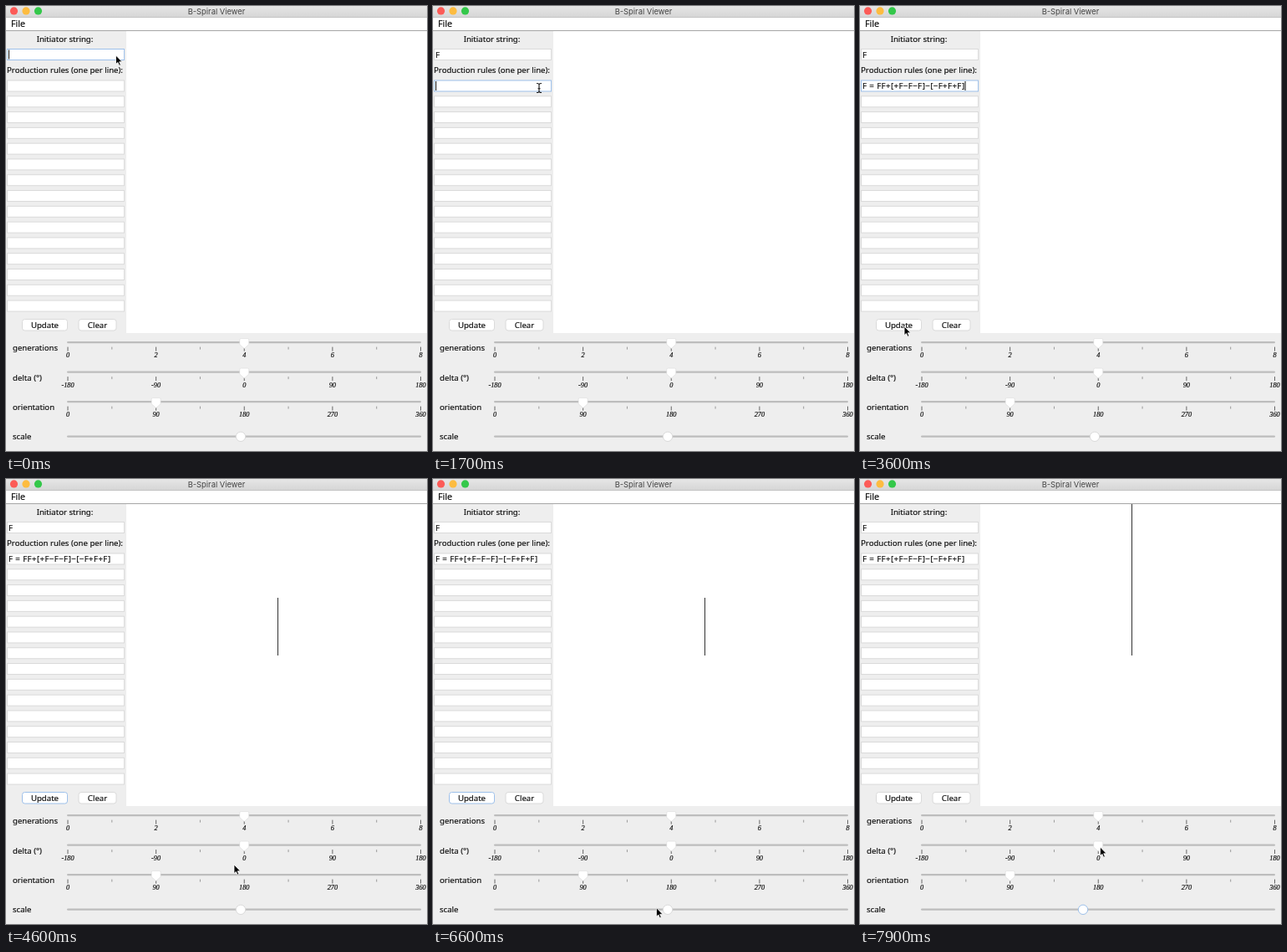
These frames come from a looping animation (504x532 px, 8000 ms). An HTML page:

```html
<!DOCTYPE html>
<html lang="en">
<head>
<meta charset="utf-8">
<title>B-Spiral Viewer</title>
<style>
  html, body { margin: 0; width: 100%; height: 100%; overflow: hidden; background: #eee; }
  svg { display: block; width: 504px; height: 532px; }
  text { font: 9.6px "Noto Sans", "Open Sans", sans-serif; fill: #111; stroke: #111; stroke-width: .18; white-space: pre; }
  .title { font: 9.4px Inter, Roboto, sans-serif; fill: #444; stroke: none; }
  .menu { font-size: 10.6px; }
  .num { font: italic 8.3px "Liberation Serif", serif; }
  .rule { letter-spacing: .43px; }
  .mid { text-anchor: middle; }
</style>
</head>
<body>
<svg id="stage" viewBox="0 0 504 532">
  <defs>
    <linearGradient id="bar" x2="0" y2="1">
      <stop stop-color="#e6e6e6"/><stop offset="1" stop-color="#d6d6d6"/>
    </linearGradient>
  </defs>
</svg>
<script>
const LOOP = 8000, STEP = 100, BLINK = 500;
const FOCUS = '#9dc0ea', EDGE = '#dadada';
// Moments of the session, in ms
const TYPE_START = 1100, PICK_RULE = 1700, PASTE = 2400, PRESS = 3900, GROW = 6700;
const stage = document.getElementById('stage');

function set(el, attrs) {
  for (const k in attrs) el.setAttribute(k, attrs[k]);
  return el;
}
function add(tag, attrs, text) {
  const el = set(document.createElementNS('http://www.w3.org/2000/svg', tag), attrs);
  if (text !== undefined) el.textContent = text;
  stage.append(el);
  return el;
}
const rect = (x, y, width, height, fill, more) => add('rect', { x, y, width, height, fill, ...more });
const label = (x, y, text, cls = '') => add('text', { x, y, class: cls }, text);
const show = (el, on) => set(el, { visibility: on ? 'visible' : 'hidden' });
const outline = (el, on) => set(el, { stroke: on ? FOCUS : EDGE });

// Window frame
rect(0, 0, 504, 13, 'url(#bar)');
rect(0, 13, 504, 1, '#c4c4c4');
rect(0, 14, 504, 15, '#fff');
rect(0, 29, 504, 1, '#a6a6a6');
rect(144, 30, 360, 361, '#fff');
['#fc5b57', '#fdbc40', '#34c84a'].forEach((fill, i) =>
  add('circle', { cx: 9.5 + i * 14.5, cy: 5.9, r: 4.6, fill }));
label(252, 9.8, 'B-Spiral Viewer', 'title mid');
label(6, 25.3, 'File', 'menu');

// Text fields
label(70.5, 43, 'Initiator string:', 'mid');
label(70.5, 80.3, 'Production rules (one per line):', 'mid');
const field = cy => rect(1.5, cy - 6.5, 140, 13, '#fff', { stroke: EDGE });
const startField = field(58);
const ruleFields = Array.from({ length: 15 }, (_, i) => field(95.5 + i * 18.79));
const startText = label(3, 61.5, 'F');
const ruleText = label(3, 99, 'F = FF+[+F−F−F]−[−F+F+F]', 'rule');
const caret = rect(0, 0, 1, 11, '#111');

// Buttons
function button(x, w, text) {
  const box = rect(x + .5, 374.5, w - 1, 13.5, '#fff', { rx: 3, stroke: EDGE });
  label(x + w / 2, 384.7, text, 'mid');
  return box;
}
const update = button(19, 55, 'Update');
button(86.5, 46, 'Clear');

// Sliders
const track = y => rect(73, y - 1.2, 424, 2.4, '#bdbdbd', { rx: 1.2 });

function slider(name, y, min, max, value) {
  const xOf = v => 74 + 422.5 * (v - min) / (max - min);
  label(8, y + 10.3, name);
  track(y);
  for (let i = 0; i <= 8; i++) {
    const v = min + (max - min) * i / 8, x = xOf(v), major = i % 2 === 0;
    rect(x - .5, y + 5.5, 1, major ? 5 : 3, major ? '#666' : '#999');
    if (major) label(x, y + 17.9, v, 'num mid');
  }
  add('path', {
    d: `M${xOf(value) - 5.5} ${y - 3}q0-1.5 1.5-1.5h8q1.5 0 1.5 1.5v5.5l-5.5 5-5.5-5z`,
    fill: '#fff', stroke: EDGE, 'stroke-width': .6
  });
}
slider('generations', 402.1, 0, 8, 4);
slider('delta (°)', 437.6, -180, 180, 0);
slider('orientation', 473.1, 0, 360, 90);
label(8, 518.3, 'scale');
track(514.6);
const knob = add('circle', { cy: 514.8, r: 5.7, fill: '#fff' });

const stem = rect(325, 142, 1, 69, '#333');

// Pointers
const arrow = add('path', {
  d: 'M0 0V10.6l2.4-2.2 1.7 3.8 1.8-.8-1.7-3.6h3.4z',
  fill: '#000', stroke: '#fff', 'stroke-width': .8
});
const beam = add('path', {
  d: 'M-3-5.5q3 0 3 1.5q0-1.5 3-1.5M0-4V4M-3 5.5q3 0 3-1.5q0 1.5 3 1.5M-1.5.8h3',
  fill: 'none', stroke: '#111', 'stroke-width': 1.1
});

// Pointer moves: begin, end, x, y
const moves = [
  [1200, 1600, 127, 98], [2600, 3600, 53, 383],
  [4300, 4600, 273, 461], [4700, 5400, 284.5, 437],
  [5700, 6700, 267, 514.5],
  [7300, 7600, 304, 453], [7700, 7900, 287.5, 440]
];
const ease = k => (1 - Math.cos(Math.PI * k)) / 2;

function pointerAt(t) {
  let x = 131.5, y = 59;
  for (const [begin, end, toX, toY] of moves) {
    const k = ease(Math.min(1, Math.max(0, (t - begin) / (end - begin))));
    x += (toX - x) * k;
    y += (toY - y) * k;
  }
  return [x, y];
}

function drawCaret(t) {
  const lastInput = [0, TYPE_START, PICK_RULE, PASTE].findLast(m => m <= t);
  const inRule = t >= PICK_RULE;
  const x = t >= PASTE ? 125.5 : t >= TYPE_START && !inRule ? 8.5 : 3;
  set(caret, { x, y: inRule ? 90 : 52.5 });
  show(caret, t < PRESS && Math.floor((t - lastInput) / BLINK) % 2 === 0);
}

function draw(t) {
  outline(startField, t < PICK_RULE);
  outline(ruleFields[0], t >= PICK_RULE && t < PRESS);
  outline(update, t >= PRESS && t < GROW);
  show(startText, t >= TYPE_START);
  show(ruleText, t >= PASTE);
  drawCaret(t);

  const grown = t >= GROW, top = grown ? 30 : 142;
  outline(knob, grown);
  set(knob, { cx: grown ? 267 : 281 });
  show(stem, t > PRESS);
  set(stem, { y: top, height: 211 - top });

  const [x, y] = pointerAt(t);
  const overText = t > 1300 && y < 366;
  show(arrow, !overText);
  show(beam, overText);
  set(overText ? beam : arrow, { transform: `translate(${x} ${y})` });
}

const start = performance.now();
function tick() {
  const t = (performance.now() - start) % LOOP;
  draw(Math.floor(t / STEP) * STEP);
  requestAnimationFrame(tick);
}
tick();
</script>
</body>
</html>
```
